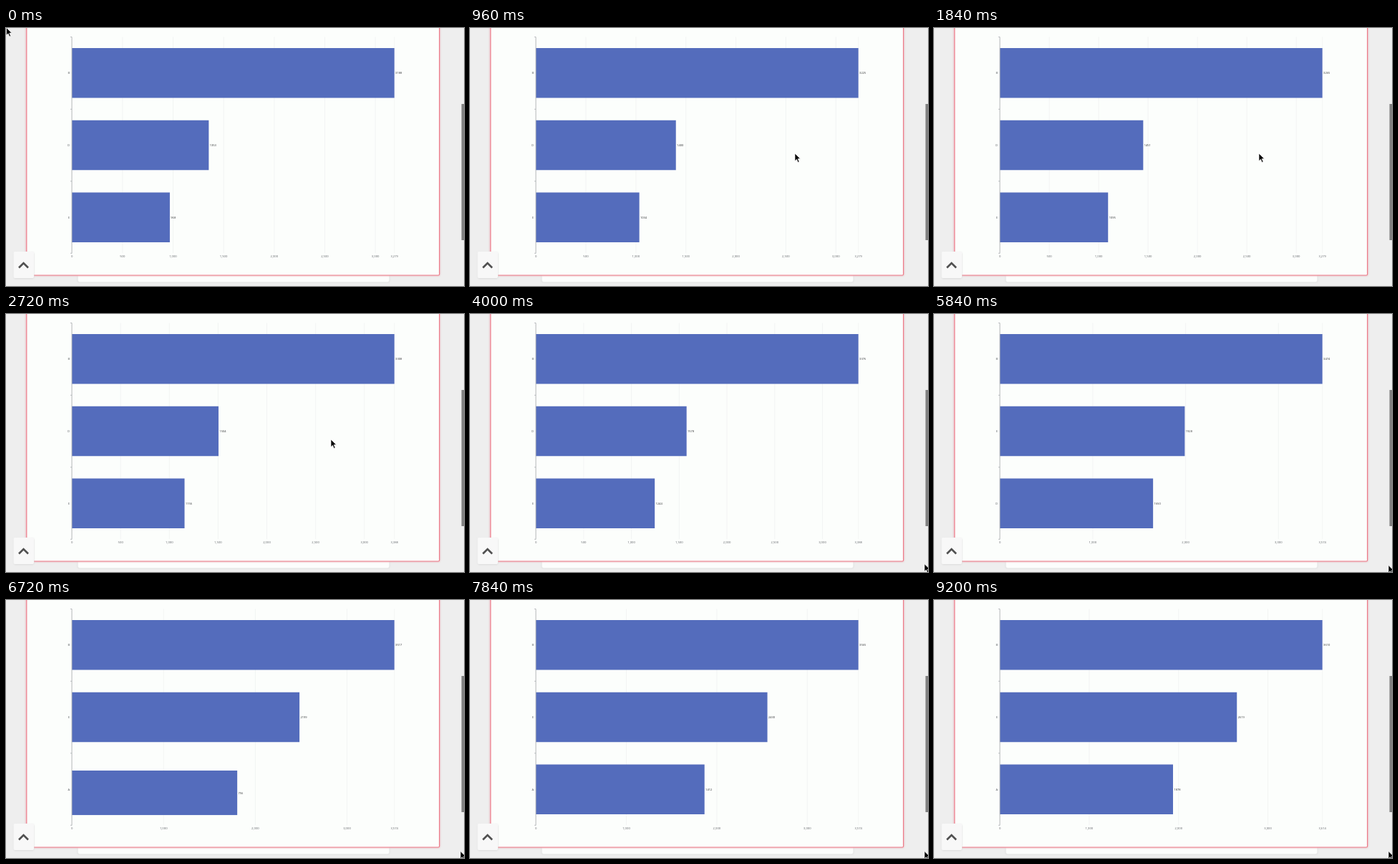
An HTML page that plays this animation: 640 by 360 pixels, repeating every 9280 ms.

```html
<!DOCTYPE html>
<html lang="en">
<head>
<meta charset="utf-8">
<title>Bar race</title>
<style>
html, body { margin: 0; width: 100%; height: 100%; overflow: hidden; background: #eeeeee; }
svg { display: block; width: 100vw; height: 100vh; }
text { font: 4px "Open Sans", "Noto Sans", sans-serif; fill: #303234; }
#scale text { font-size: 4.2px; fill: #606468; }
#names text { fill: #505458; }
</style>
</head>
<body>
<svg id="stage" viewBox="0 0 640 360">
  <defs>
    <clipPath id="plot"><rect x="80" y="12" width="520" height="302"/></clipPath>
    <filter id="soft" x="-30%" y="-30%" width="160%" height="160%"><feGaussianBlur stdDeviation="1.3"/></filter>
  </defs>
  <rect width="640" height="360" fill="#eeeeee"/>
  <rect x="100" y="330" width="436" height="25" rx="3" fill="#dcdcdc" filter="url(#soft)"/>
  <rect x="100.5" y="330" width="435" height="24.5" rx="3" fill="#fcfdfc"/>
  <rect x="28.5" y="-10" width="577" height="355" rx="1.5" fill="none" stroke="#e8b4bb" stroke-width="2" filter="url(#soft)"/>
  <rect x="28.8" y="-10" width="576.8" height="355" rx="1.5" fill="#fcfefc" stroke="#ee7c8a" stroke-width="1.2"/>
  <g id="grid" stroke="#f0f2f1" stroke-width=".8"></g>
  <g id="bars" clip-path="url(#plot)"></g>
  <path d="M92 12.5V314.5M90 12.5h2M90 113.3h2M90 213.8h2M90 314.3h2" fill="none" stroke="#a9adb0" stroke-width=".8"/>
  <g id="scale" text-anchor="middle"></g>
  <g id="names" text-anchor="end"></g>
  <rect x="636.5" y="106" width="4" height="190" fill="#808080"/>
  <rect x="11" y="313" width="28" height="36.5" rx="2" fill="#d2d2d2" filter="url(#soft)"/>
  <rect x="10.5" y="312" width="28.5" height="37" rx="2" fill="#f8f8f8"/>
  <path d="M18 334.5L24.5 328L31 334.5" fill="none" stroke="#505050" stroke-width="2.6"/>
  <path id="cursor" d="M0 0V10.6L2.5 8.3L4.3 12.5L6.1 11.7L4.3 7.6H7.7Z" fill="#000" stroke="#fff" stroke-width=".7"/>
</svg>
<script>
// Times are in seconds.
const LOOP = 9.28, STEP = .08;
const LEFT = 92.1, WIDTH = 450.6, TOP = 28, PITCH = 100.75, BAR = 69.5, FLOOR = 309;
const SWAP = 5.24, ENTER = 6.452, SLIDE = .3;
const SURGE = 4.57, SURGE_END = 6.72;
const REFRESH = [2.14, 4.22, 8.08, 9.37];

const ramp = (t, from, to) => Math.min(1, Math.max(0, (t - from) / (to - from)));
const mix = (a, b, p) => a + (b - a) * p;
const easeOut = p => 1 - (1 - p) ** 2;
const cubic = (a, b, c, d) => t => a + t * (b + t * (c + t * d));

// Bar values; the counters of the two rising bars trail behind their widths.
const lead = cubic(3188, 34.4, 4.63, -.368);
const second = cubic(1353, 42.7, 7.64, -1.07);
const steady = t => 968 + 69 * t;
const climber = t => steady(t) + 1050 * ramp(t, SURGE, SURGE_END);
const climberCount = t => steady(t) + 1100 * (1 - Math.exp(-Math.max(0, t - SURGE) / 1.8));
const entrant = t => 1803 + 54.4 * (t - 6.72);
const entrantCount = t => entrant(t) * ramp(t, ENTER, ENTER + 3) ** .36;

const $ = id => document.getElementById(id);
function set(el, attrs) {
  for (const k in attrs) el.setAttribute(k, attrs[k]);
}
function add(parent, tag, attrs = {}) {
  const el = document.createElementNS("http://www.w3.org/2000/svg", tag);
  set(el, attrs);
  return parent.appendChild(el);
}
const show = (parts, on) => {
  for (const el of Object.values(parts)) el.setAttribute("visibility", on ? "visible" : "hidden");
};
const rowY = row => TOP + PITCH * row;
const comma = n => String(n).replace(/(\d)(\d{3})$/, "$1,$2");

const bars = Array.from({ length: 4 }, () => ({
  rect: add($("bars"), "rect", { x: LEFT, fill: "#546cbc" }),
  label: add($("bars"), "text")
}));
const ticks = Array.from({ length: 8 }, () => ({
  line: add($("grid"), "line", { y1: 12.5, y2: 314 }),
  label: add($("scale"), "text", { y: 320.4 })
}));
const names = [0, 1, 2].map(i => add($("names"), "text", { x: 89, y: rowY(i) + BAR / 2 + 1.5 }));

function drawBar(bar, value, count, max, y, height = BAR) {
  const w = value / max * WIDTH;
  set(bar.rect, { y, width: w, height });
  set(bar.label, { x: LEFT + w + 1.4, y: y + height / 2 + 1.5 });
  bar.label.textContent = Math.round(count);
}

function drawAxis(max, t) {
  const limit = Math.round(lead(REFRESH.find(r => r > t)));
  const unit = limit > 3500 ? 1000 : 500;
  ticks.forEach((tick, i) => {
    const last = i === ticks.length - 1, value = i * unit;
    const x = LEFT + (last ? 1 : value / max) * WIDTH;
    show(tick, last || value <= 3000);
    set(tick.line, { x1: x, x2: x });
    set(tick.label, { x });
    tick.label.textContent = comma(last ? limit : value);
  });
}

function drawCursor(t) {
  const first = easeOut(ramp(t, .16, .8));
  const x = mix(mix(.5, 454, first), 635, easeOut(ramp(t, 3.12, 3.7)));
  const y = mix(mix(-.5, 175, first), 350.5, easeOut(ramp(t, 3.12, 4.1)));
  $("cursor").setAttribute("transform", `translate(${x} ${y})`);
}

function draw(t) {
  const max = lead(t);
  const swap = ramp(t, SWAP, SWAP + SLIDE), enter = ramp(t, ENTER, ENTER + SLIDE);

  drawBar(bars[0], max, max, max, rowY(0));
  drawBar(bars[1], second(t), second(t), max, rowY(1 + swap + enter));
  drawBar(bars[2], climber(t), climberCount(t), max, rowY(2 - swap));
  drawBar(bars[3], entrant(t), entrantCount(t), max, mix(FLOOR, rowY(2), enter), BAR * enter);
  show(bars[1], enter < 1);
  show(bars[3], enter > 0);

  const order = t < SWAP ? "BDE" : t < ENTER ? "BED" : "BEA";
  names.forEach((el, i) => { el.textContent = order[i]; });
  drawAxis(max, t);
  drawCursor(t);
}

const start = performance.now();
function frame() {
  const t = (performance.now() - start) / 1000 % LOOP;
  draw(Math.floor(t / STEP) * STEP);
  requestAnimationFrame(frame);
}
frame();
</script>
</body>
</html>
```
